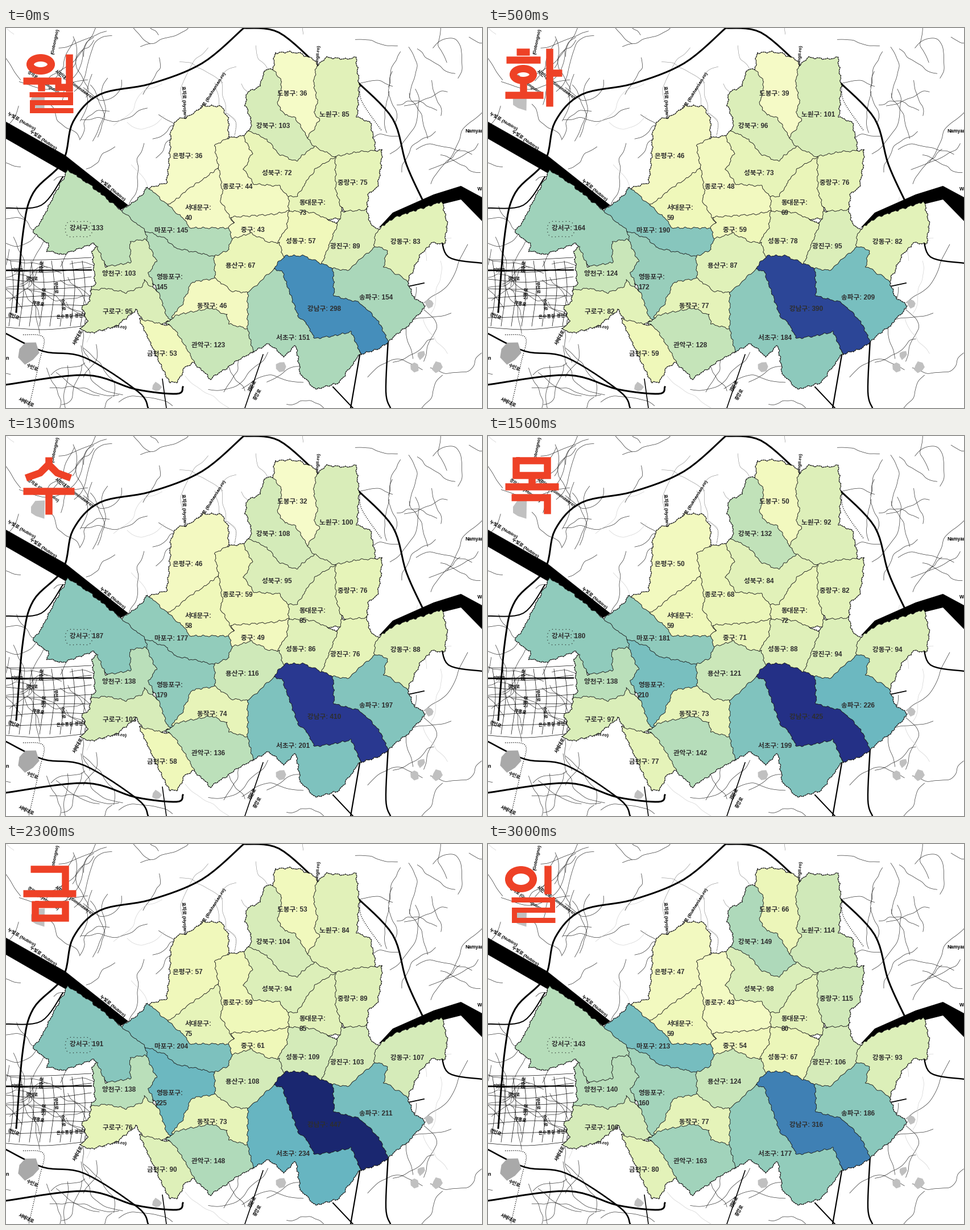
Recreate the animation shown at these times as a matplotlib script. Size 837x669 px, loop 3500 ms.

```python
import matplotlib.pyplot as plt
import numpy as np
from matplotlib.animation import FuncAnimation
from matplotlib.patches import Ellipse, Polygon

W, H, DPI = 837, 669, 64
PX = 72 / DPI  # points per pixel
FONTS = ["Liberation Sans", "Noto Sans CJK JP"]
RED = "#ee4126"
TOP_COUNT = 476

rng = np.random.default_rng(12)
fig = plt.figure(figsize=(W / DPI, H / DPI), dpi=DPI, facecolor="white")
ax = fig.add_axes([0, 0, 1, 1])
ax.set_xlim(0, W)
ax.set_ylim(H, 0)
ax.axis("off")


def pairs(xy):
    return np.reshape(xy, (-1, 2)).astype(float)


def curve(pts, n=8):
    """Catmull-Rom curve through the points."""
    p = np.vstack([pts[:1], pts, pts[-1:]])
    t = np.linspace(0, 1, n, endpoint=False)[:, None]
    parts = []
    for a, b, c, d in zip(p, p[1:], p[2:], p[3:]):
        parts.append(0.5 * (2 * b + (c - a) * t + (2 * a - 5 * b + 4 * c - d) * t**2
                            + (3 * b - a - 3 * c + d) * t**3))
    return np.vstack(parts + [p[-1:]])


def rough(pts):
    """Closed outline with a small waviness that depends on position only."""
    out = []
    for a, b in zip(pts, np.roll(pts, -1, axis=0)):
        n = max(1, int(np.hypot(*(b - a)) / 2))
        out.append(a + (b - a) * np.arange(n)[:, None] / n)
    x, y = np.vstack(out).T
    return np.column_stack([x + 1.1 * np.sin(0.4 * y + 0.15 * x) + 0.6 * np.sin(1.0 * y),
                            y + 1.1 * np.sin(0.4 * x - 0.15 * y) + 0.6 * np.sin(0.9 * x)])


def road(width, *xy, color="black", style="-"):
    x, y = curve(pairs(xy)).T
    ax.plot(x, y, style, color=color, lw=width * PX, zorder=1)


def web(count, x0, y0, x1, y1, color="#333333", width=0.7):
    """Wandering minor roads that start inside a box."""
    for _ in range(count):
        turn = rng.uniform(0, 2 * np.pi) + np.cumsum(rng.normal(0, 0.3, 9))
        step = rng.uniform(8, 17)
        x = rng.uniform(x0, x1) + np.cumsum(step * np.cos(turn))
        y = rng.uniform(y0, y1) + np.cumsum(step * np.sin(turn))
        road(width, *np.column_stack([x, y]).ravel(), color=color)


def area(color, *xy):
    ax.add_patch(Polygon(pairs(xy), fc=color, ec="none", zorder=1.2))


def pond(x, y, r, color="#c0c0c0"):
    angle = np.arange(7) * 2 * np.pi / 7
    reach = r * rng.uniform(0.6, 1.2, 7)
    area(color, *np.column_stack([x + reach * np.cos(angle), y + reach * np.sin(angle)]).ravel())


def note(x, y, text, angle=0, size=8):
    ax.text(x, y, text, size=size * PX, family=FONTS, rotation=angle, color="black",
            ha="center", va="center", weight="bold", zorder=1.5)


def shade(count):
    """Yellow-green-blue scale, converted from sRGB to a wide-gamut display."""
    rgb = np.array(plt.get_cmap("YlGnBu")(count / TOP_COUNT)[:3])
    lin = np.where(rgb > 0.04045, ((rgb + 0.055) / 1.055) ** 2.4, rgb / 12.92)
    lin = np.array([[0.8225, 0.1775, 0], [0.0332, 0.9668, 0], [0.0171, 0.0724, 0.9105]]) @ lin
    return np.clip(np.where(lin > 0.0031308, 1.055 * lin ** (1 / 2.4) - 0.055, lin * 12.92), 0, 1)


districts = []


def district(name, x, y, counts, *corners):
    """Later districts cover the hidden sides of earlier ones."""
    pts = rough(pairs(corners))
    ax.add_patch(Polygon(pts, fill=False, ec="black", lw=2 * PX, ls=(0, (0.8, 1.2)), zorder=1.8))
    shape = ax.add_patch(Polygon(pts, ec="#1c1c1c", lw=0.9 * PX, zorder=2))
    style = dict(size=11.7 * PX, family=FONTS, weight="bold", color="#2e2e2e", zorder=4)
    label = ax.text(x, y + 4.3, name + ":", **style)
    second = ax.text(x, y + 22.3, "", **style) if len(name) == 4 else None
    districts.append((name, counts, shape, label, second))


# Minor roads
web(20, 0, 0, 290, 130)
web(8, 130, 130, 290, 250)
web(7, 290, 0, 540, 90, "#777777", 0.5)
web(26, 630, 0, 837, 260)
web(9, 710, 430, 837, 640)
web(8, 330, 630, 560, 669)
web(14, 0, 570, 260, 669)
web(16, 0, 400, 130, 530)
web(7, 0, 200, 80, 390)
web(18, 0, 0, 837, 669, "#cccccc", 0.6)
for k in range(8):
    y, x = 408 + 17 * k, 8 + 18 * k
    road(0.7, 0, y, 70, y + 6 * np.sin(k), 150, y - 4)
    road(0.7, x, 410, x + 5, 460, x - 3, 525)
road(1, 388, 150, 404, 165, 402, 190, style=":")
road(1.3, 30, 540, 66, 545, 58, 590, 40, 669, style=":")
road(1.3, 622, 100, 626, 130, 660, 180, style=":")

# Main roads
road(3, 418, 0, 345, 62, 255, 98, 165, 117, 118, 165, 100, 235, 48, 290, 30, 360, 18, 500)
road(3, 418, 0, 480, 8, 550, 68)
road(3, 618, 95, 680, 160, 704, 240, 734, 306)
road(2.4, 765, 362, 778, 403, 837, 414)
road(2.6, 0, 538, 65, 569, 138, 580, 232, 640, 250, 669)
road(3, 0, 628, 140, 611, 228, 636, 300, 644, 311, 632)
road(2.2, 0, 427, 150, 426)
road(2, 0, 317, 62, 312, 100, 262)
road(2.4, 672, 548, 668, 640, 676, 669)
road(2.2, 623, 570, 606, 669)
road(2, 575, 632, 610, 669)
road(1.6, 452, 575, 420, 669)
road(1.6, 275, 618, 282, 669)
road(1.8, 707, 455, 735, 449)

# Water
area("black", 0, 165, 104, 224, 215, 312, 202, 320, 104, 255, 0, 195)
area("black", 655, 352, 680, 325, 752, 293, 800, 278, 837, 298, 837, 340, 800, 302, 735, 318)
pond(38, 572, 20, "#a9a9a9")
pond(55, 130, 18)
pond(745, 485, 10)
for x, y in [(730, 575), (720, 597), (758, 597), (483, 596), (265, 632)]:
    pond(x, y, 9)

# Road names
note(87, 24, "(Gobongno)", 78)
note(119, 99, "시민대로 (Simindaero)", -36)
note(65, 96, "경의로 (Gyeonguiro)", -35, 7)
note(313, 132, "효자로 (Hyojaro)", -87)
note(360, 117, "북한산로 (Bukhansan-ro)", 58)
note(549, 50, "(Dongil-ro)", 85)
note(27, 164, "누빛로 (Nubiro)", -30)
note(66, 197, "누빛로 (Nubiro)", -34)
note(187, 285, "누빛로 (Nubiro)", -39)
note(823, 181, "Namyar", size=8.5)
note(833, 283, "W", size=8.5)
note(2, 582, "n", size=9)
note(20, 427, "의왕로")
note(46, 442, "광천로")
note(86, 457, "부천로", -87)
note(68, 467, "신흥로", 85)
note(64, 420, "길주로", 85)
note(98, 487, "수도로", -85)
note(13, 508, "경인로", -20)
note(57, 486, "부흥로", -10)
note(116, 508, "온수동길 경인로", 3)
note(127, 545, "서해대로", 62)
note(199, 527, "(Ori-ro)", -5)
note(46, 598, "수인로", -25)
note(35, 660, "서해대로", -25)
note(434, 630, "관문로", 60)
note(443, 645, "중앙로", 60)

# Districts: name, label position, one count per day, corners
district("은평구", 293, 225, (36, 46, 46, 50, 57, 49, 47),
         391, 194, 391, 160, 378, 138, 347, 137, 318, 158, 302, 160, 290, 180, 288, 225,
         283, 272, 252, 282, 262, 300, 300, 330, 340, 320, 395, 260, 400, 200)
district("노원구", 551, 152, (85, 101, 100, 92, 84, 146, 114),
         546, 66, 565, 52, 598, 55, 615, 52, 621, 100, 617, 157, 640, 166, 650, 211,
         640, 225, 570, 240, 520, 200, 530, 75)
district("도봉구", 477, 115, (36, 39, 32, 50, 53, 66, 66),
         470, 72, 473, 44, 503, 42, 520, 46, 547, 59, 541, 98, 548, 133, 541, 148, 552, 162,
         531, 192, 518, 200, 490, 165, 468, 120)
district("성북구", 450, 255, (72, 73, 95, 84, 94, 135, 98),
         417, 190, 428, 181, 450, 175, 520, 205, 541, 208, 579, 227, 570, 260, 520, 310,
         480, 300, 400, 300, 400, 200)
district("중랑구", 583, 272, (75, 76, 76, 82, 89, 111, 115),
         579, 226, 620, 218, 661, 215, 659, 245, 653, 280, 637, 293, 634, 320, 620, 340,
         570, 300, 571, 245)
district("강북구", 440, 172, (103, 96, 108, 132, 104, 150, 149),
         455, 75, 470, 72, 485, 95, 478, 134, 490, 153, 506, 156, 541, 208, 510, 235, 480, 222,
         457, 195, 428, 181, 432, 165, 421, 135, 424, 113, 446, 103)
district("동대문구", 516, 307, (73, 69, 85, 72, 85, 96, 80),
         579, 226, 580, 285, 591, 323, 590, 335, 510, 340, 485, 310, 497, 297, 512, 296,
         531, 266, 545, 248)
district("종로구", 381, 279, (44, 48, 59, 68, 59, 71, 43),
         367, 207, 391, 194, 417, 190, 433, 220, 418, 250, 437, 275, 480, 278, 497, 297,
         497, 322, 490, 340, 400, 350, 360, 300, 374, 247)
district("서대문구", 315, 316, (40, 59, 58, 59, 75, 78, 59),
         374, 247, 381, 290, 376, 304, 399, 341, 400, 350, 390, 370, 330, 370, 290, 325,
         286, 311, 330, 277)
district("중구", 413, 355, (43, 59, 49, 71, 61, 73, 54),
         392, 352, 400, 341, 396, 333, 470, 328, 497, 322, 510, 345, 490, 380, 410, 380, 385, 365)
district("성동구", 492, 375, (57, 78, 86, 88, 109, 102, 67),
         497, 322, 540, 325, 583, 345, 595, 350, 580, 420, 540, 425, 490, 420, 477, 377, 494, 352)
district("광진구", 570, 384, (89, 95, 76, 94, 103, 128, 106),
         591, 323, 634, 320, 641, 347, 655, 354, 665, 375, 640, 420, 600, 440, 555, 425,
         555, 416, 583, 345)
district("강동구", 676, 376, (83, 82, 88, 94, 107, 135, 93),
         655, 354, 685, 333, 767, 306, 776, 345, 771, 380, 748, 378, 728, 400, 707, 444,
         700, 455, 660, 440, 648, 400, 648, 370)
district("송파구", 621, 474, (154, 209, 197, 226, 211, 244, 186),
         575, 423, 600, 427, 650, 384, 671, 391, 664, 419, 705, 444, 717, 475, 738, 489,
         711, 520, 672, 552, 640, 540, 560, 480)
district("용산구", 386, 418, (67, 87, 116, 121, 108, 133, 124),
         375, 385, 397, 371, 430, 361, 463, 377, 481, 378, 488, 405, 495, 410, 475, 440,
         430, 480, 385, 470, 350, 430)
district("강서구", 112, 352, (133, 164, 187, 180, 191, 225, 143),
         109, 250, 150, 278, 202, 321, 225, 325, 260, 375, 200, 440, 165, 405, 155, 379,
         130, 388, 100, 399, 72, 392, 75, 380, 47, 360, 65, 335, 82, 300)
district("양천구", 169, 432, (103, 124, 138, 138, 138, 171, 140),
         152, 393, 160, 385, 176, 420, 219, 413, 218, 376, 244, 372, 275, 390, 255, 465,
         160, 480, 149, 462, 157, 450)
district("마포구", 261, 356, (145, 190, 177, 181, 204, 265, 213),
         249, 280, 311, 335, 325, 352, 392, 352, 397, 370, 391, 390, 366, 402, 290, 400,
         245, 357, 202, 321, 232, 302)
district("구로구", 170, 499, (95, 82, 103, 97, 76, 114, 106),
         149, 462, 175, 458, 212, 466, 240, 455, 243, 444, 285, 480, 290, 515, 250, 530,
         228, 496, 196, 524, 150, 537, 131, 531, 143, 517, 133, 490, 147, 482)
district("영등포구", 264, 438, (145, 172, 179, 210, 225, 204, 160),
         245, 357, 283, 372, 297, 387, 366, 402, 368, 441, 350, 460, 300, 512, 284, 512,
         270, 470, 250, 432, 265, 411, 250, 381)
district("금천구", 248, 573, (53, 59, 58, 77, 90, 84, 80),
         234, 512, 282, 523, 310, 530, 332, 587, 315, 597, 302, 623, 288, 624, 262, 572)
district("동작구", 336, 489, (46, 77, 74, 73, 73, 83, 77),
         327, 447, 368, 441, 397, 463, 425, 466, 440, 540, 400, 545, 320, 520, 290, 509, 308, 490)
district("관악구", 326, 558, (123, 128, 136, 142, 148, 158, 163),
         282, 521, 300, 505, 362, 493, 388, 505, 392, 521, 427, 530, 445, 550, 436, 570,
         402, 588, 360, 618, 332, 590, 297, 530)
district("서초구", 475, 545, (151, 184, 201, 199, 234, 218, 177),
         425, 466, 472, 424, 495, 425, 560, 530, 610, 530, 623, 574, 612, 588, 585, 625,
         545, 636, 518, 610, 510, 558, 488, 578, 462, 555, 435, 570, 425, 530)
district("강남구", 530, 494, (298, 390, 410, 425, 447, 476, 316),
         470, 424, 490, 401, 522, 401, 575, 423, 577, 472, 622, 483, 656, 517, 672, 552,
         655, 565, 624, 574, 607, 535, 575, 542, 543, 547, 528, 518, 515, 511, 485, 428)

# Dotted trace above the fills
turn = np.linspace(0, 2 * np.pi, 20)
ax.plot(128 + 24 * np.cos(turn), 354 + 16 * np.sin(turn) + 3 * np.sin(3 * turn),
        color="#222222", lw=1.2 * PX, ls=(0, (1, 4)), zorder=3)

# Weekday signs
signs = []


def sign(*strokes, ring=None, thin=()):
    """Letter strokes as polylines; a ring is centre, width and height."""
    parts = []
    for group, width in ((strokes, 12.5), (thin, 9)):
        for xy in group:
            x, y = pairs(xy).T
            parts += ax.plot(x, y, color=RED, lw=width * PX, zorder=5,
                             solid_capstyle="butt", solid_joinstyle="miter")
    if ring:
        x, y, w, h = ring
        parts.append(ax.add_patch(Ellipse((x, y), w - 13, h - 13, fill=False, ec=RED,
                                          lw=13 * PX, zorder=5)))
    signs.append(parts)


def rieul(y, step):
    return (41, y, 113, y, 113, y + step, 46, y + step, 46, y + 2 * step, 118, y + 2 * step)


def mieum(x0, y0, x1, y1):
    return (x0, y0, x1, y0, x1, y1, x0, y1, x0, y0 - 6)


sign((30, 93, 97, 93), (62, 93, 62, 111), (111, 46, 111, 112), (86, 104, 108, 104),
     ring=(61, 64, 50, 36), thin=[rieul(117, 14)])
sign((50, 42, 73, 42), (32, 56, 92, 56), (62, 97, 62, 114), (30, 118, 97, 118),
     (108, 36, 108, 138), (108, 79, 130, 79), ring=(62, 82, 48, 34))
sign((30, 97, 120, 97), (75, 97, 75, 138), (75, 37, 75, 54),
     (35, 74, 60, 65, 75, 50, 90, 65, 114, 74))
sign(mieum(49, 43, 104, 69), (77, 69, 77, 84), (30, 89, 124, 89), (41, 108, 104, 108, 104, 137))
sign((43, 44, 104, 44, 104, 84), (30, 87, 123, 87), mieum(51, 106, 104, 130))
sign((41, 46, 108, 46), (41, 67, 106, 67), (41, 89, 109, 89), (48, 40, 48, 95),
     (75, 95, 75, 115), (30, 121, 121, 121))
sign((105, 38, 105, 88), ring=(58, 62, 56, 46), thin=[rieul(98, 18)])


def update(i):
    for name, counts, shape, label, second in districts:
        shape.set_facecolor(shade(counts[i]))
        if second:
            second.set_text(str(counts[i]))
        else:
            label.set_text(f"{name}: {counts[i]}")
    for k, parts in enumerate(signs):
        for part in parts:
            part.set_visible(k == i)
    return []


anim = FuncAnimation(fig, update, frames=7, interval=500, repeat=True, repeat_delay=0)
plt.show()
```
